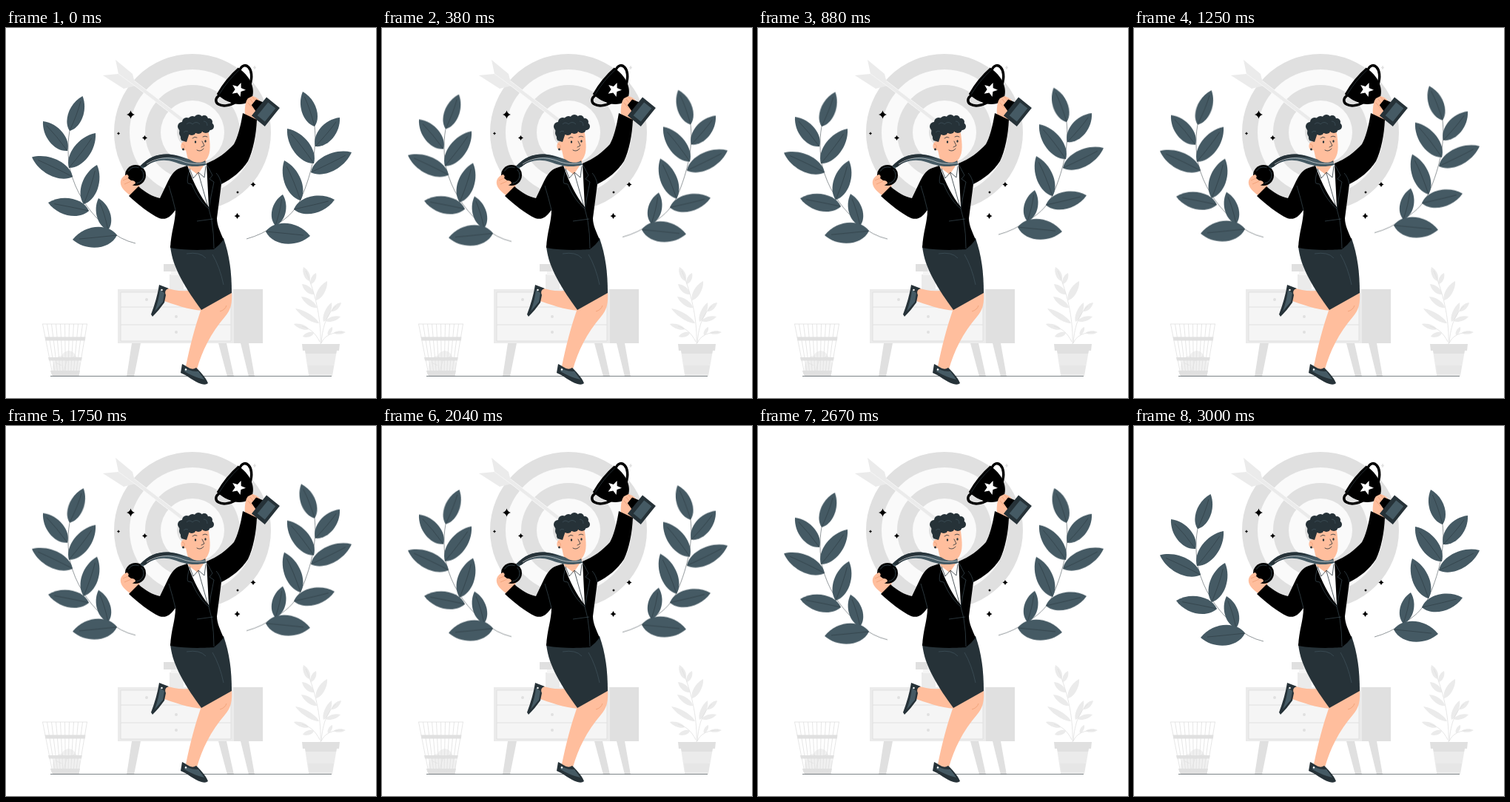
Write an HTML page that moves like this. It is 500 px wide and 500 px high and loops after 3040 ms.

```html
<!DOCTYPE html>
<html lang="en">
<head>
<meta charset="utf-8">
<title>Celebration</title>
<style>
html, body { margin: 0; width: 100%; height: 100%; overflow: hidden; background: #fff; }
svg { display: block; width: 100vw; height: 100vh; }
.float { animation: float 3.04s linear infinite; }
.sway { animation: sway 3.04s linear infinite; }
@keyframes float {
  0%, 98.68%, 100% { transform: translateY(0); }
  49.34% { transform: translateY(-10px); }
}
@keyframes sway {
  0%, 98.68%, 100% { transform: rotate(0); }
  49.34% { transform: rotate(var(--turn)); }
}
.leaf { fill: #455a64; }
.rib { fill: none; stroke: #263238; stroke-width: .5; }
.pale { fill: #ebebeb; }
.grey { fill: #e0e0e0; }
.mist { fill: #f5f5f5; }
.edge { fill: none; stroke: #e0e0e0; }
.skin { fill: #ffbe9d; }
.dark { fill: #263238; }
.ink { fill: none; stroke: #263238; stroke-width: .8; stroke-linecap: round; stroke-linejoin: round; }
.seam { fill: none; stroke: #455a64; stroke-width: .6; }
</style>
</head>
<body>
<svg viewBox="0 0 500 500">
  <!-- target and arrow -->
  <g id="target"></g>
  <path d="M170 75L173 71L242 124L239 128Z" fill="#ebebeb" stroke="#fafafa" stroke-width=".8"/>
  <path class="pale" d="M131 64L152 62L148 43L171 62L175 78L159 82Z"/>
  <path d="M152 62L174 78" fill="none" stroke="#fafafa" stroke-width=".7"/>

  <!-- cabinet -->
  <path class="pale" d="M213 319H240V329H213ZM221 333H240V353H221Z"/>
  <path class="grey" d="M213 319H229V329H213Z"/>
  <path class="mist" d="M223 329H240V334H223Z"/>
  <path class="grey" d="M170 426H182L173 471H163ZM287 426H298L308 471H299ZM317 426H328L336 471H328ZM308 353H347V426H308Z"/>
  <path d="M151 353H308V426H151Z" fill="#ebebeb"/>
  <path class="mist" d="M155 357H304V423H155Z"/>
  <path class="edge" d="M155 357H304V423H155ZM155 377H304M155 401H304" stroke-width="1"/>
  <g class="grey"><circle cx="190" cy="367" r="2"/><circle cx="230" cy="390" r="2"/><circle cx="230" cy="411" r="2"/><circle cx="270" cy="367" r="2"/></g>

  <!-- basket -->
  <path d="M63 464C62 450 67 444 75 443C79 434 91 434 94 443C101 447 101 456 99 464Z" fill="#f0f0f0"/>
  <path d="M75 443L82 450L94 443M82 450L78 464M67 452L75 456" class="edge" stroke-width=".7"/>
  <path class="grey" d="M52.500 417.500H107.500L106.800 422.500H53.500ZM57 445H102.800L102 449.500H58ZM60 463H100L98.500 470.500H64Q61.500 470 60 463Z"/>
  <path id="basket" class="edge" stroke-width=".8"/>

  <!-- potted plant -->
  <g id="plant" class="pale"></g>
  <path d="M425 428C426 400 421 365 405 328M426 426C428 400 435 385 446 376M426 426C430 416 440 411 455 411M424 424C418 412 411 406 400 403" class="edge" stroke-width=".8"/>
  <path class="pale" d="M404 436H447L441 470H409Z"/>
  <path class="grey" d="M400 427H451L450 436H401Z"/>
  <path class="grey" d="M404 436H447L446 440H405Z"/>
  <path d="M408 456H443L441 468H410Z" fill="#e6e6e6"/>

  <path d="M60 470.500H440" stroke="#263238" stroke-width=".6"/>

  <g id="left" class="float"></g>
  <g id="right" class="float"></g>

  <!-- legs -->
  <path class="skin" d="M252 354C238 357 226 354 215 351L211 368C226 373 246 381 266 382Z"/>
  <path d="M207 347L220 352Q213 354 216 361L214 371C209 378 204 384 198 390L196 387C201 374 205 360 207 347Z" fill="#263238"/>
  <path d="M208 354L214 358L212 370L201 383C205 372 207 363 208 354Z" fill="#455a64"/>
  <circle cx="210.500" cy="354" r="1.200" fill="#fff"/>
  <path class="skin" d="M264 379C255 405 249 428 243 457Q250 464 258 461C265 437 276 413 296 390C304 381 306 371 305 357Z"/>
  <path d="M238 454Q242 456 245 458Q252 463 257 459C262 464 270 472 273 480Q270 483 264 481C254 478 246 470 236 466Z" fill="#263238"/>
  <path d="M242 459C248 464 256 464 260 464L268 475C258 473 248 468 241 464Z" fill="#455a64"/>
  <circle cx="243" cy="461.500" r="1.200" fill="#fff"/>
  <path d="M289 383Q296 381 298 375" fill="none" stroke="#eb996e" stroke-width=".7"/>

  <path class="dark" d="M222 294C224 318 236 343 264 381L305 358C305 330 302 307 294 284Z"/>
  <path class="seam" d="M244 305Q262 302 270 311M279 306Q289 323 294 347"/>

  <!-- hand with trophy -->
  <g transform="translate(300 72) rotate(-51)">
    <path d="M-21 3C-37 -2 -37 18 -15 26M21 3C37 -2 37 18 15 26" fill="none" stroke="#000" stroke-width="3.500"/>
    <path d="M-23 -1Q0 -5 23 -1C24 18 17 34 4 39L3 47L8 55H-8L-3 47L-4 39C-17 34 -24 18 -23 -1Z"/>
    <path d="M-21 2Q0 -1 21 2" fill="none" stroke="#263238" stroke-width=".8"/>
    <path id="star" fill="#fff"/>
  </g>
  <path class="skin" d="M323 119C322 107 324 98 327 95L333 92Q341 94 344 100L340 105L347 112L338 127Z"/>
  <path d="M330 96L336 104M333 93L341 103M327 101L333 108" fill="none" stroke="#eb996e" stroke-width=".7"/>
  <g transform="translate(300 72) rotate(-51)">
    <path d="M-5 45H5L8 55H-8Z"/>
    <path class="dark" d="M-16 54H16V77H-16Z"/>
    <path class="leaf" d="M-11 60H12V73H-11Z"/>
  </g>

  <!-- hand with medal -->
  <path class="skin" d="M180 217L170 228C164 223 158 219 156 214C153 207 156 202 161 199L168 195L181 207Z"/>
  <circle cx="175" cy="199" r="14"/>
  <circle cx="175" cy="199" r="11" fill="none" stroke="#455a64" stroke-width=".7" stroke-dasharray="16 4"/>
  <path class="skin" d="M155 209Q157 201 163 198Q167 199 165 203L169 206Q175 206 175 210L167 215Z"/>
  <path d="M158 206L165 203M160 211L169 207" fill="none" stroke="#eb996e" stroke-width=".7"/>

  <!-- neck and shirt -->
  <path class="skin" d="M245 168L247 193L262 205L271 190L270 176Z"/>
  <path d="M244 187L259 198L270 182L277 200L274 246L252 212Z" fill="#fff"/>
  <path class="ink" d="M248 190L253 203L260 195L268 202L270 187M260 196L273 242" stroke-width=".6"/>

  <!-- jacket -->
  <path d="M245 186L236 189C229 191 224 197 219 207L208 230C198 228 188 222 179 214L166 227C178 238 194 251 207 257C217 260 222 255 229 246C229 262 223 276 222 297C244 301 270 300 281 299Q289 293 294 286C290 276 285 267 285 257L291 211C305 204 318 194 327 180C334 165 338 145 339 124L320 115C317 133 313 148 308 157C298 168 286 177 271 183L274 242C263 228 253 209 247 191Z"/>
  <path class="seam" d="M248 191C246 200 244 207 246 210L251 211C257 226 266 238 274 244L277 228L281 208L275 204L279 199L271 184M274 244L278 260Q281 278 281 298M258 261L280 258M220 213Q225 229 229 246M291 211Q289 201 284 196" stroke="#263238"/>

  <!-- ribbon -->
  <path d="M181 187C196 171 214 168 230 172C244 175 253 182 269 179L271 185C252 190 239 185 227 181C211 176 196 180 185 190Z" fill="#455a64"/>
  <path d="M181 187C195 171 213 168 229 172L245 178C224 172 208 172 188 188Z" fill="#263238"/>
  <path d="M190 184C207 173 223 174 241 181C251 184 260 184 271 182" fill="none" stroke="#fff" stroke-width=".6"/>

  <!-- head -->
  <path class="skin" d="M243 140C250 133 268 133 274 142C276 157 277 168 272 176C266 185 251 183 245 174L243 165C235 168 234 153 242 153Z"/>
  <circle cx="239.500" cy="164" r="1.400" class="dark"/>
  <g id="hair" class="dark"></g>
  <path class="dark" d="M234 137C234 126 245 120 258 120C270 120 277 126 278 137C266 142 253 138 248 142L244 154L237 152Z"/>
  <path d="M244 130Q248 126 252 130Q257 125 262 130M267 126Q272 126 272 132M240 141Q243 138 246 140" fill="none" stroke="#455a64" stroke-width=".6"/>
  <path class="ink" d="M252 149Q255 146 258 148M266 147Q269 145 272 147M265 153L268 159L264 161M258 165Q263 168 267 163"/>
  <ellipse cx="256" cy="154" rx="1.200" ry="1.700" class="dark"/>
  <ellipse cx="269.500" cy="153" rx="1.200" ry="1.700" class="dark"/>
  <path d="M238 157Q242 157 241 162" fill="none" stroke="#eb996e" stroke-width=".7"/>

  <path id="sparks"/>
  <path d="M336 51Q336 53.500 338 53.500Q336 53.500 336 56Q336 53.500 334 53.500Q336 53.500 336 51" fill="#e0e0e0" stroke="#e0e0e0" stroke-width=".6"/>
</svg>
<script>
const el = id => document.getElementById(id);
const add = (id, markup) => el(id).insertAdjacentHTML('beforeend', markup);

// Pointed leaf from base to tip, bulging w to either side.
function leafPath(tx, ty, bx, by, w) {
  const dx = tx - bx, dy = ty - by, len = Math.hypot(dx, dy);
  const at = (k, s) => `${bx + dx * k - dy / len * w * s} ${by + dy * k + dx / len * w * s}`;
  return `M${bx} ${by}C${at(.18, 1)} ${at(.7, 1.05)} ${tx} ${ty}C${at(.7, -1.05)} ${at(.18, -1)} ${bx} ${by}Z`;
}

function branch(id, stem, leaves, turn) {
  add(id, `<path class="rib" d="${stem}"/>`);
  leaves.forEach(([tx, ty, bx, by, w], i) => {
    const mid = `M${bx} ${by}Q${bx + (tx - bx) * .5 + 2} ${by + (ty - by) * .5} ${bx + (tx - bx) * .85} ${by + (ty - by) * .85}`;
    const sway = i ? '' : ` class="sway" style="--turn:${turn}deg;transform-origin:${bx}px ${by}px"`;
    add(id, `<g${sway}><path class="leaf" d="${leafPath(tx, ty, bx, by, w)}"/><path class="rib" d="${mid}"/></g>`);
  });
}

branch('left', 'M86 139C82 160 84 187 90 203C99 230 116 253 139 272Q154 286 175 291', [
  [103.500, 92, 86, 139, 13], [50, 126, 83, 166, 14], [121, 142, 85, 189, 15],
  [35, 174.500, 90, 201, 15], [123, 185, 105, 238, 14.500], [57, 236, 112, 247, 15],
  [125, 230, 138, 273, 12], [90, 286, 150, 280, 18]], 1.8);
branch('right', 'M417 133C420 160 415 193 398 232C389 250 376 260 364 266Q347 279 325 285', [
  [401, 86, 417, 133, 13], [451, 121, 418, 160, 14], [380, 136, 416, 183, 15],
  [467, 168, 412, 195, 15], [376, 179, 398, 233, 14.500], [444, 232, 389, 245, 15],
  [374, 225, 364, 267, 12], [411, 281, 351, 275, 18]], -3);

[106, 85, 64, 43, 21].forEach((r, i) =>
  add('target', `<circle cx="252" cy="141" r="${r}" fill="${i % 2 ? '#fafafa' : '#e0e0e0'}"/>`));

let weave = 'M49 400H110';
for (let i = 0; i <= 10; i++) weave += `M${49.5 + i * 6} 400L${63 + i * 3.5} 468`;
el('basket').setAttribute('d', weave);

[[402, 323, 410, 342, 5], [419, 331, 412, 346, 4], [400, 346, 416, 360, 5], [434, 342, 419, 368, 6],
 [399, 363, 420, 378, 5], [440, 371, 429, 397, 5], [453, 371, 440, 383, 4], [452, 390, 432, 396, 4],
 [391, 379, 423, 399, 5], [389, 400, 409, 407, 4], [401, 417, 416, 412, 4], [459, 411, 443, 412, 3],
 [441, 404, 435, 415, 3]].forEach(l => add('plant', `<path d="${leafPath(...l)}"/>`));

[[238, 133, 6], [244, 127, 6], [252, 125, 6], [260, 123, 6], [268, 123, 5], [274, 127, 5],
 [276, 133, 5], [270, 136, 6], [260, 137, 6], [251, 139, 6], [240, 142, 6], [240, 148, 4]]
  .forEach(([x, y, r]) => add('hair', `<circle cx="${x}" cy="${y}" r="${r}"/>`));

let star = '';
for (let i = 0; i < 10; i++) {
  const a = Math.PI * (i / 5 - .5), r = i % 2 ? 4.4 : 10;
  star += `${i ? 'L' : 'M'}${r * Math.cos(a)} ${18 + r * Math.sin(a)}`;
}
el('star').setAttribute('d', star + 'Z');

const spark = ([x, y, r]) => {
  const q = r * .22;
  return `M${x} ${y - r}Q${x + q} ${y - q} ${x + r} ${y}Q${x + q} ${y + q} ${x} ${y + r}` +
    `Q${x - q} ${y + q} ${x - r} ${y}Q${x - q} ${y - q} ${x} ${y - r}Z`;
};
el('sparks').setAttribute('d', [[168.5, 117, 5.5], [187.5, 148.5, 3.5], [152, 142.5, 2.2],
  [334, 211.5, 3.5], [312.5, 254, 4], [313, 222, 2]].map(spark).join(''));
</script>
</body>
</html>
```
